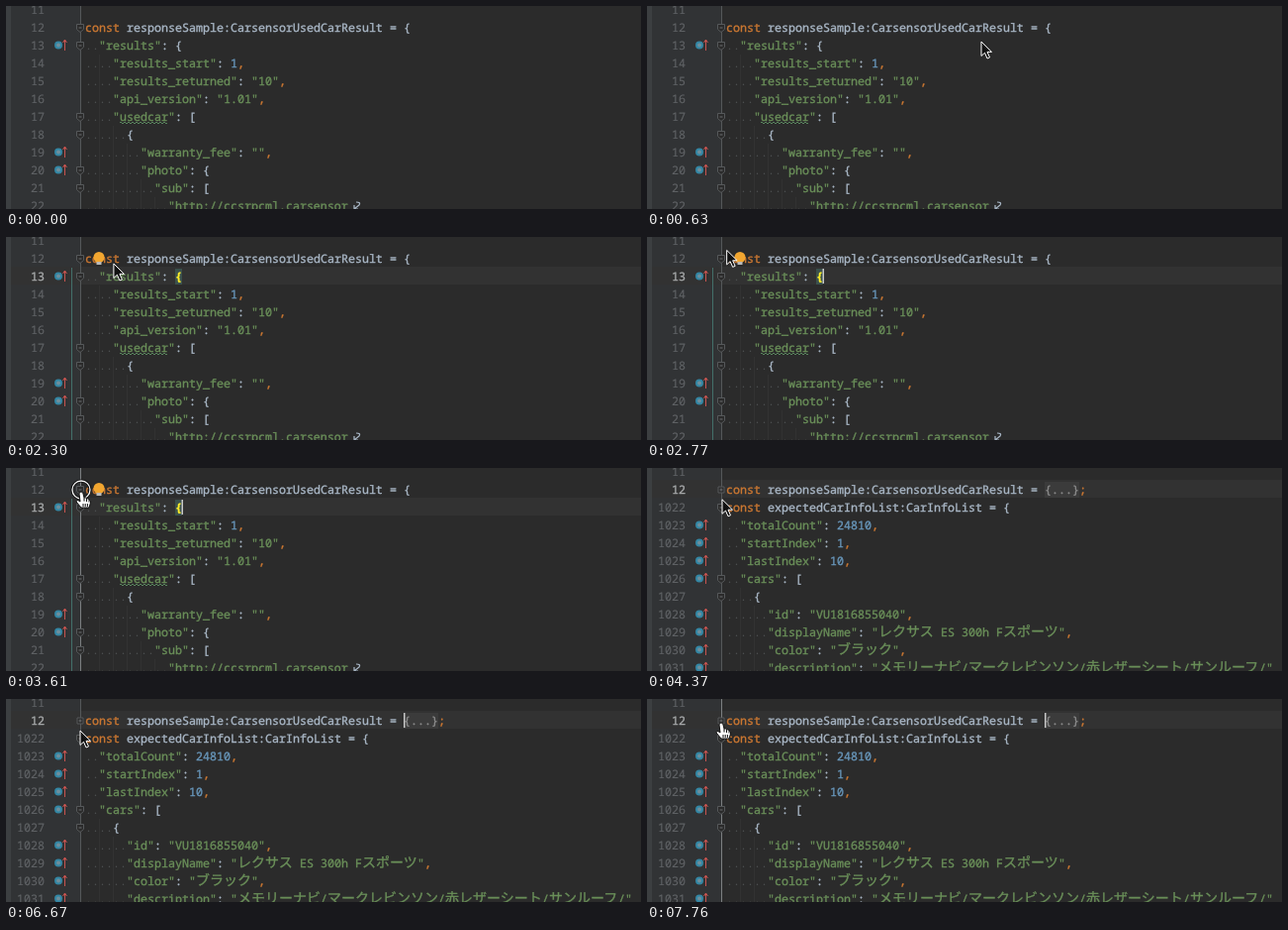
An HTML page for the animation above (8000 ms loop, 642x205 px).

```html
<!DOCTYPE html>
<html lang="ja">
<head>
<meta charset="utf-8">
<title>Code folding</title>
<style>
html, body { margin: 0; width: 100%; height: 100%; overflow: hidden; background: #2b2b2b; }
svg { display: block; width: 642px; height: 205px; }
text { font: 11.667px "Noto Sans Mono", "DejaVu Sans Mono", monospace; white-space: pre;
  text-rendering: geometricPrecision; color: #a9b7c6;
  fill: currentColor; stroke: currentColor; stroke-width: .35px; }
.wide { font: 14px "Noto Sans CJK JP", "Noto Sans CJK", sans-serif; }
.keyword, .punct { color: #cc7832; }
.string { color: #6a8f59; }
.number { color: #6897bb; }
.dots { color: #4c4f50; stroke: none; }
.folded { color: #8c8c8c; }
.line { color: #606366; text-anchor: end; stroke-width: .15px; }
.line.current { color: #a8aaab; stroke-width: .35px; }
.brace { color: #ffef28; font-weight: 700; }
</style>
</head>
<body>
<svg id="stage" viewBox="0 0 642 205"></svg>
<script>
const LOOP = 8000, CHAR = 7, ROW = 18, LEFT = 80;
const stage = document.getElementById('stage');

function add(parent, tag, attrs = {}, content = '') {
  const node = document.createElementNS('http://www.w3.org/2000/svg', tag);
  for (const key in attrs) node.setAttribute(key, attrs[key]);
  node.textContent = content;
  return parent.appendChild(node);
}
const rect = (parent, x, y, width, height, fill) => add(parent, 'rect', { x, y, width, height, fill });
const show = (node, on) => { node.style.display = on ? '' : 'none'; };
const rowY = row => 4 + row * ROW;

// Row format: line number, gutter marks (f = foldable, p = folded, i = implements), code
const FIRST = 'const responseSample:CarsensorUsedCarResult = ';
const SECOND = 'const expectedCarInfoList:CarInfoList = ';
const opened = [
  [11], [12, 'f', FIRST + '{'],
  [13, 'fi', '  "results": {'],
  [14, '', '    "results_start": 1,'],
  [15, '', '    "results_returned": "10",'],
  [16, '', '    "api_version": "1.01",'],
  [17, 'f', '    "usedcar": ['],
  [18, 'f', '      {'],
  [19, 'i', '        "warranty_fee": "",'],
  [20, 'fi', '        "photo": {'],
  [21, 'f', '          "sub": ['],
  [22, '', '            "http://ccsrpcml.carsensor']
];
const firstFolded = [
  [11], [12, 'p', FIRST + '{...};'],
  [1022, 'f', SECOND + '{'],
  [1023, 'i', '  "totalCount": 24810,'],
  [1024, 'i', '  "startIndex": 1,'],
  [1025, 'i', '  "lastIndex": 10,'],
  [1026, 'fi', '  "cars": ['],
  [1027, 'f', '    {'],
  [1028, 'i', '      "id": "VU1816855040",'],
  [1029, 'i', '      "displayName": "レクサス ES 300h Fスポーツ",'],
  [1030, 'i', '      "color": "ブラック",'],
  [1031, 'i', '      "description": "メモリーナビ/マークレビンソン/赤レザーシート/サンルーフ/"']
];
const bothFolded = [
  [11], [12, 'p', FIRST + '{...};'], [1022, 'p', SECOND + '{...};'],
  ...Array.from({ length: 9 }, (_, i) => [1109 + i])
];

function tokenClass(token) {
  if (token === 'const') return 'keyword';
  if (token[0] === '"') return 'string';
  if (token === '{...}') return 'folded';
  if (/^\d/.test(token)) return 'number';
  return /^[,;]/.test(token) ? 'punct' : '';
}

function drawCode(parent, code, y) {
  const indent = code.search(/\S/);
  for (let col = 2; col < indent; col += 2) rect(parent, LEFT + col * CHAR, y - 9, 1, ROW, '#323232');
  if (indent) add(parent, 'text', { x: LEFT, y: y + 4, class: 'dots' }, '.'.repeat(indent));
  let x = LEFT + indent * CHAR;
  for (const token of code.trim().match(/const\b|"[^"]*"?|\{\.\.\.\}|\b\d+|[,;]|[a-zA-Z]+|[^,;"\w]/g)) {
    if (token === '{...}') rect(parent, x, y - 8, 5 * CHAR, 16, '#3b3b3b');
    for (const part of token.match(/[\u3000-\u9fff]+|[^\u3000-\u9fff]+/g)) {
      const wide = part.charCodeAt(0) >= 0x3000;
      add(parent, 'text', { x, y: y + 4, class: tokenClass(token) + (wide ? ' wide' : '') }, part);
      x += part.length * CHAR * (wide ? 2 : 1);
    }
  }
}

function drawFold(parent, y, closed) {
  const d = closed ? `M72 ${y - 3}h6v6h-6z` : `M71.5 ${y - 3.5}h7v5l-3.5 3l-3.5 -3z`;
  add(parent, 'path', { d, fill: '#2b2b2b', stroke: '#56595b' });
  add(parent, 'path', { d: `M73.5 ${y}h3` + (closed ? `M75 ${y - 1.5}v3` : ''), stroke: '#6a6d6f' });
}

function drawImplements(parent, y) {
  add(parent, 'circle', { cx: 53, cy: y - .5, r: 3, fill: '#6f8f9c', stroke: '#3387a5', 'stroke-width': 2 });
  add(parent, 'path', { d: `M59.5 ${y + 5}v-11m-2 3l2 -3l2 3`, fill: 'none', stroke: '#c75450' });
}

function drawScene(rows) {
  const group = add(stage, 'g');
  const numbers = rows.map(([number, marks = '', code], row) => {
    const y = rowY(row);
    if (code) drawCode(group, code, y);
    if (/[fp]/.test(marks)) drawFold(group, y, marks.includes('p'));
    if (marks.includes('i')) drawImplements(group, y);
    return add(group, 'text', { x: 39, y: y + 4, class: 'line' }, number);
  });
  return { group, numbers };
}

rect(stage, 0, 0, 642, 205, '#2b2b2b');
rect(stage, 0, 0, 5, 205, '#3c3f41');
rect(stage, 5, 0, 70, 205, '#313335');
const band = rect(stage, 5, 0, 637, ROW, '#323232');
const foldLine = rect(stage, 75, 0, 1, 205, '#55585a');
const scope = rect(stage, 66, 31, 1, 174, '#43706a');

const scenes = [opened, firstFolded, bothFolded].map(drawScene);
const openGroup = scenes[0].group;
add(openGroup, 'path', { d: 'M115 118' + 'q1 -2 2 0t2 0'.repeat(12), fill: 'none', stroke: '#659c6b', 'stroke-width': .8 });
add(openGroup, 'path', { d: 'M354 198q5 0 3 3l-5 4m0 -4v4h4', fill: 'none', stroke: '#a9b7c6', 'stroke-width': 1.2 });
rect(scenes[2].group, 638, 0, 4, 205, '#4a4c4d');

function drawBrace(x, row) {
  const group = add(stage, 'g');
  rect(group, x, rowY(row) - 8, CHAR, 16, '#3b514d');
  add(group, 'text', { x, y: rowY(row) + 4, class: 'brace' }, '{');
  return group;
}
const innerBrace = drawBrace(171, 2);
const outerBrace = drawBrace(402, 1);
const caret = rect(stage, 0, 0, 1.5, 15, '#c8c8c8');

const bulb = add(stage, 'g');
add(bulb, 'circle', { cx: 94, cy: 20.5, r: 5.5, fill: '#f2a630' });
rect(bulb, 91.5, 25, 5, 3, '#b9b9b9');

const ring = add(stage, 'g', { fill: 'none' });
add(ring, 'circle', { r: 9, stroke: '#111', 'stroke-width': 3 });
add(ring, 'circle', { r: 9, stroke: '#f4f4f4', 'stroke-width': 1.3 });
const arrow = add(stage, 'path', { d: 'M0 0V14.5L3.5 11.3L6 17L8.5 16L6 10.4H10.5Z',
  fill: '#111', stroke: '#fff', 'stroke-linejoin': 'round' });
const hand = add(stage, 'path', {
  d: 'M-2 4Q-2 2 0 2T2 4L3 8Q5 7 5.5 9Q7.5 8 8 10Q10 10 9.5 13L8 18H0L-5 12Q-5 9 -1 12Z' +
    'M3 8V11.5M5.5 9V12M8 10V12.5M2 14V17M4.2 14V17M6.4 14V17',
  fill: '#fff', stroke: '#111', 'stroke-linejoin': 'round' });

const path = [
  [120, 524, 184], [300, 430, 106], [450, 366, 57], [630, 338, 36], [750, 337, 34],
  [1850, 337, 34], [2050, 235, 32], [2300, 109, 27], [2480, 92, 12], [2650, 82, 11],
  [2680, 82, 11], [2950, 78, 18], [3170, 76, 22], [4200, 76, 22], [4550, 76, 42],
  [6490, 76, 42], [6670, 75, 32], [6900, 75, 22], [LOOP, 75, 22]
];
const clicks = [[1110, 1250], [3580, 3730], [4850, 4940], [6050, 6250], [7020, 7140], [7700, 7760]];
const caretOff = [[1850, 2700], [4230, 4850], [5540, 6110], [6800, 7080]];
const folds = [[0, 0], [3670, 1], [4880, 2], [6110, 1], [7080, 0], [7760, 1]];
const within = (ranges, t) => ranges.some(([from, to]) => t >= from && t < to);

function pointerAt(t) {
  const next = path.findIndex(point => point[0] > t);
  if (next <= 0) return path[0].slice(1);
  const [t0, x0, y0] = path[next - 1], [t1, x1, y1] = path[next];
  const k = (t - t0) / (t1 - t0);
  return [x0 + (x1 - x0) * k, y0 + (y1 - y0) * k];
}

function render(t) {
  const state = folds.filter(([from]) => t >= from).pop()[1];
  const current = t < 1170 ? -1 : t < 3670 ? 2 : 1;
  scenes.forEach(({ group, numbers }, i) => {
    show(group, i === state);
    numbers.forEach((number, row) => number.classList.toggle('current', row === current));
  });

  show(band, current > 0);
  band.setAttribute('y', rowY(current) - 10);
  show(scope, current > 0 && state === 0);
  show(innerBrace, current === 2);
  show(outerBrace, current === 1 && state === 0);
  show(bulb, t >= 1850 && t < 3670);
  show(caret, current > 0 && !within(caretOff, t));
  caret.setAttribute('x', current === 2 ? 177.5 : 402);
  caret.setAttribute('y', rowY(current) - 8);

  const [x, y] = pointerAt(t);
  const onFold = x < 80 && Math.min(Math.abs(y - 22), Math.abs(y - 42)) < 7;
  for (const node of [ring, arrow, hand]) node.setAttribute('transform', `translate(${x} ${y})`);
  foldLine.setAttribute('fill', onFold ? '#7c7f81' : '#55585a');
  show(ring, within(clicks, t));
  show(hand, onFold);
  show(arrow, t >= 120 && !onFold);
}

function tick() {
  render(performance.now() % LOOP);
  requestAnimationFrame(tick);
}
tick();
</script>
</body>
</html>
```
